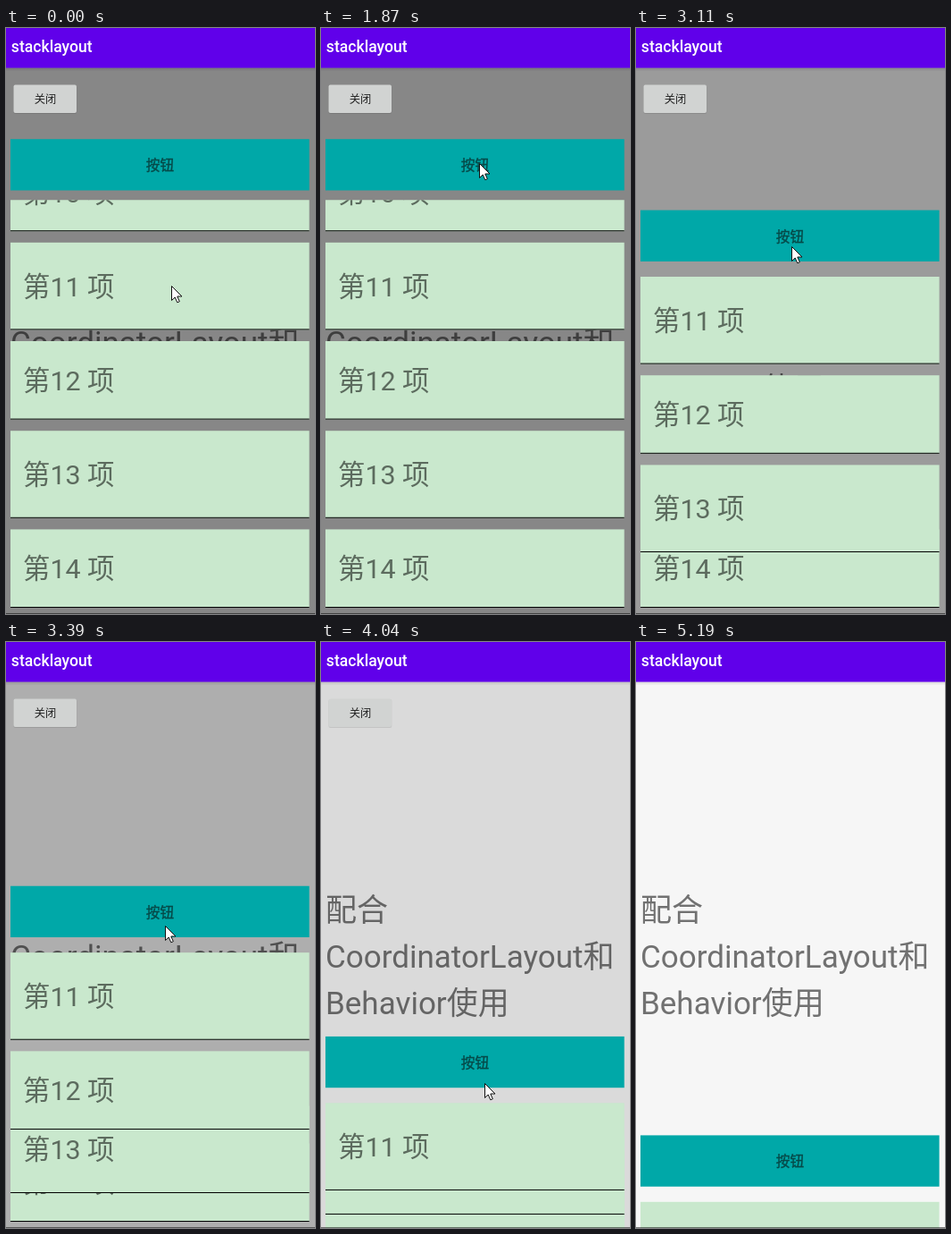
Recreate the animation shown at these times as an HTML page. Size 346 by 655 pixels, loop 6090 ms.

```html
<!DOCTYPE html>
<html lang="zh-CN">
<head>
<meta charset="utf-8">
<title>stacklayout</title>
<style>
html, body { margin: 0; width: 100%; height: 100%; overflow: hidden; background: #fafafa; }
svg { display: block; width: 346px; height: 655px; }
text { font-family: Roboto, "Noto Sans CJK SC", "Noto Sans CJK", sans-serif; }
.intro { font-size: 35px; fill: #000; fill-opacity: .54; }
.item text { font-size: 30.4px; fill: #5c6b5e; }
.medium { font-weight: 500; }
.label { text-anchor: middle; }
</style>
</head>
<body>
<svg viewBox="0 0 346 655">
  <defs>
    <linearGradient id="fade" x2="0" y2="1">
      <stop stop-opacity=".12"/><stop offset="1" stop-opacity="0"/>
    </linearGradient>
    <clipPath id="viewport"><rect id="clip" width="346" height="655"/></clipPath>
  </defs>
  <rect width="346" height="655" fill="#fafafa"/>
  <g class="intro">
    <text x="5" y="312">配合</text>
    <text x="5" y="364">CoordinatorLayout和</text>
    <text x="5" y="416">Behavior使用</text>
  </g>
  <rect id="dim" width="346" height="655"/>
  <g id="close">
    <rect x="8.5" y="64" width="70.8" height="32" rx="2" fill-opacity=".1"/>
    <rect x="8.5" y="63.5" width="70.5" height="31.5" rx="2" fill="#d1d3d2"/>
    <text class="medium label" x="44" y="84" font-size="12.3" fill="#222">关闭</text>
  </g>
  <g id="list" clip-path="url(#viewport)"></g>
  <g id="button">
    <rect x="5" width="334.6" height="57.3" fill="#00a8a8"/>
    <text class="medium label" x="172.5" y="35" font-size="15.7" fill="#064a49" stroke="#064a49" stroke-width=".4">按钮</text>
  </g>
  <rect y="44.6" width="346" height="4" fill="url(#fade)"/>
  <rect width="346" height="44.6" fill="#6000ea"/>
  <text class="medium" x="5.8" y="27" font-size="17.6" fill="#fff">stacklayout</text>
  <rect y="654" width="346" height="1" fill-opacity=".5"/>
  <path id="cursor" d="M.5 .5V16.5L4.2 13 6.8 18.8 9.3 17.7 6.8 12H12Z" fill="#fff" stroke="#111"/>
</svg>
<script>
const LOOP = 6090, TICK = 30, PHASE = 10;
const CLOSED = 551.4;  // button top when the sheet is fully down
const PILE = 616;      // bottom edge where items start to pile up
const PEEK = 27;       // least distance between piled bottom edges
const GAP = 12.6;

// [ms, button top]
const drag = [
  [2320, 124.2], [2590, 131], [3100, 203.6], [3760, 372.6], [4360, 524.4], [4630, CLOSED]
];
// [ms, tip x, tip distance below the button top]
const pointer = [
  [100, 185, 164], [400, 233, 233], [720, 193, 87], [1090, 177, 27], [2320, 177, 26],
  [2590, 176, 57], [3100, 174, 40], [3760, 184, 51], [4360, 182, 53], [4780, 182, 46],
  [5170, 260, 104]
];

const $ = id => document.getElementById(id);
const move = (el, x, y) => el.setAttribute('transform', `translate(${x} ${y})`);

function sample(keys, t) {
  const next = keys.findIndex(key => key[0] > t);
  if (next < 1) return keys.at(next).slice(1);
  const [[t0, ...from], [t1, ...to]] = keys.slice(next - 1, next + 1);
  return from.map((v, i) => v + (to[i] - v) * (t - t0) / (t1 - t0));
}

const items = [];
for (let n = 10, y = 139.6; n <= 14; n++) {
  const height = n % 2 ? 97.6 : 87.6;
  const el = document.createElementNS('http://www.w3.org/2000/svg', 'g');
  el.setAttribute('class', 'item');
  el.innerHTML = `<rect x="5" width="334.6" height="${height}" fill="#c9e8cd"/>
    <rect x="5" y="${height - 1}" width="334.6" height="1"/>
    <text x="19" y="${height / 2 + 11.2}">第${n} 项</text>`;
  $('list').prepend(el);
  items.push({ el, height, rest: y + height });
  y += height + GAP;
}

// The first two items follow the button; later ones pile up at the screen bottom.
function layoutItems(buttonTop) {
  const shift = Math.max(0, buttonTop - 165.4);
  let above = 0;
  items.forEach(({ el, height, rest }, i) => {
    const natural = rest + shift;
    const bottom = i < 2 ? natural : Math.min(natural, Math.max(PILE, rest, above + PEEK));
    move(el, 0, bottom - height);
    above = bottom;
  });
}

function draw(t) {
  const [top] = sample(drag, t);
  const [x, below] = sample(pointer, t);
  move($('button'), 0, top);
  layoutItems(top);
  $('clip').setAttribute('y', top + 68);
  $('dim').setAttribute('fill-opacity', .464 - (top - 124) * .00105);
  $('close').style.display = top < CLOSED ? '' : 'none';
  move($('cursor'), Math.round(x), Math.round(top + below));
}

const start = performance.now();
function frame(now) {
  const t = Math.max(0, now - start) % LOOP;
  draw(Math.floor((t - PHASE) / TICK) * TICK + PHASE);
  requestAnimationFrame(frame);
}
draw(0);
requestAnimationFrame(frame);
</script>
</body>
</html>
```
